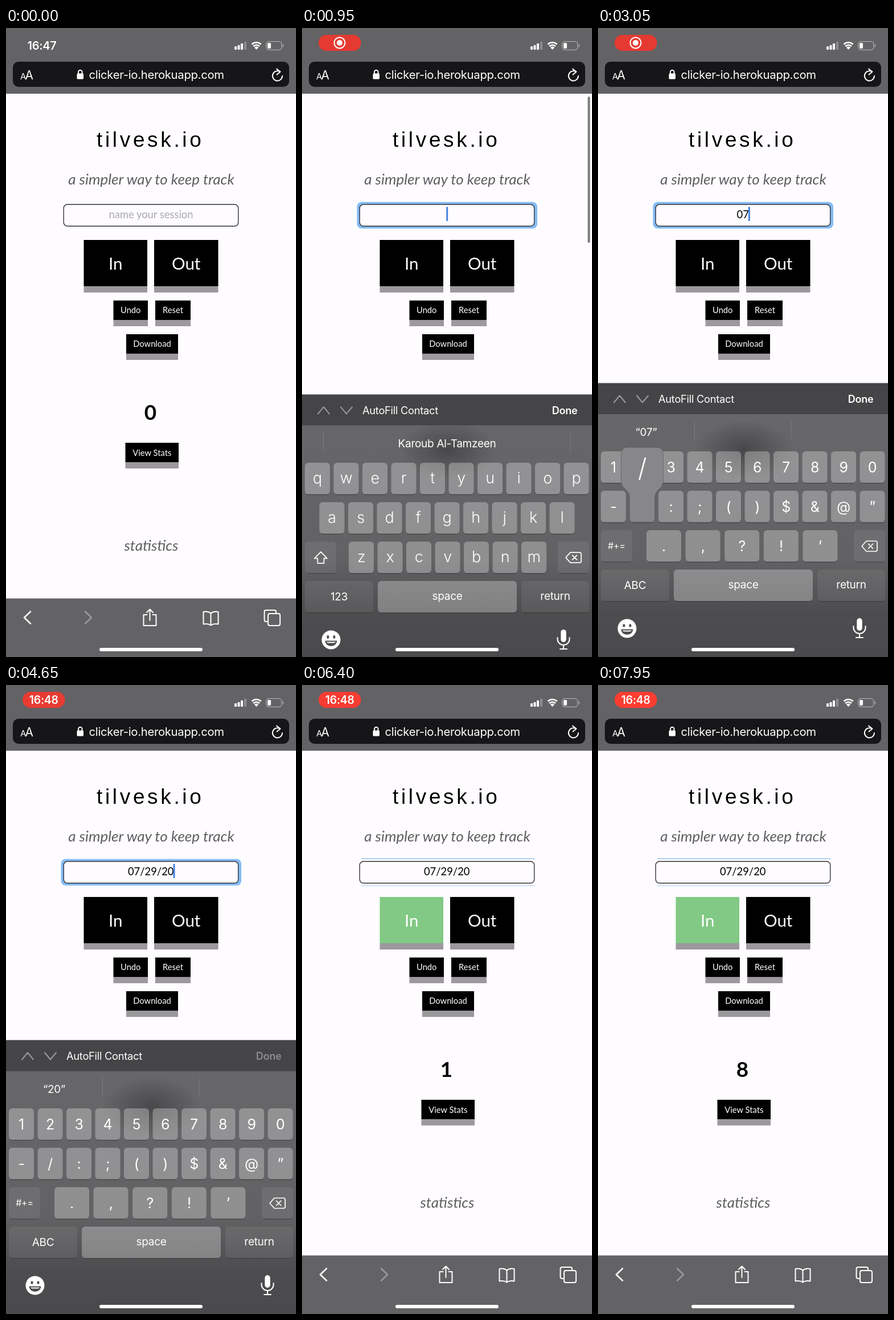
An HTML page that plays this animation: 509 by 1101 pixels, repeating every 8000 ms.

```html
<!DOCTYPE html>
<html lang="en">
<head>
<meta charset="utf-8">
<title>Counter demo</title>
<style>
  html, body { margin: 0; width: 100%; height: 100%; overflow: hidden; background: #fefcff; }
  svg { display: block; width: 509px; height: 1101px; }
  text { font-family: Inter, "Liberation Sans", sans-serif; letter-spacing: -.015em; fill: #fff; text-anchor: middle; }
  .lato { font-family: Lato, sans-serif; letter-spacing: 0; }
  .lead { font-size: 26px; font-style: italic; fill: #5f5e60; }
  .line { fill: none; stroke: #fff; stroke-width: 2; stroke-linecap: round; stroke-linejoin: round; }
  .dim { stroke: #9a999b; }
  .start { text-anchor: start; }
</style>
</head>
<body>
<svg viewBox="0 0 509 1101">
  <defs>
    <linearGradient id="backdrop" gradientUnits="userSpaceOnUse" x1="0" y1="676" x2="0" y2="1101">
      <stop offset="0" stop-color="#676668"/>
      <stop offset=".6" stop-color="#626163"/>
      <stop offset=".82" stop-color="#4d4c4e"/>
      <stop offset="1" stop-color="#4a494b"/>
    </linearGradient>
    <radialGradient id="smear">
      <stop offset="0" stop-color="#434244" stop-opacity=".85"/>
      <stop offset=".4" stop-color="#434244" stop-opacity=".5"/>
      <stop offset="1" stop-color="#434244" stop-opacity="0"/>
    </radialGradient>
    <clipPath id="panelClip"><rect id="panelArea" width="509" height="1101"/></clipPath>
  </defs>
  <rect width="509" height="1101" fill="#fefcff"/>

  <g id="page">
    <text x="159" y="208" class="start" style="font:36.9px 'Liberation Sans',Arial,sans-serif;letter-spacing:4.7px;fill:#000">tilvesk.io</text>
    <text x="255" y="274" class="lato lead">a simpler way to keep track</text>
    <text x="255" y="915" class="lato lead">statistics</text>
    <rect id="ring" x="96.5" y="304.500" width="316.500" height="46.500" rx="8" fill="#86bcf5"/>
    <g id="ringTrace" fill="none" stroke-width="1.5">
      <path d="M104 304H408" stroke="#94c2f2"/><path d="M104 351.5H408" stroke="#c3d5f5"/>
    </g>
    <rect x="101.2" y="308.800" width="306.500" height="38" rx="6.5" fill="#fefcff" stroke="#333235" stroke-width="1.4"/>
    <text id="hint" x="254.5" y="333" class="lato" font-size="18.4" style="fill:#a9a8ab">name your session</text>
    <text id="entry" x="254.2" y="333" class="lato" font-size="18.4" style="fill:#000"></text>
    <rect id="caret" y="313" width="3" height="25" rx="1" fill="#4484e0"/>
    <g id="buttons"></g>
    <text id="count" x="253.5" y="686" class="lato" font-size="36.9" font-weight="700" style="fill:#000"></text>
    <rect id="scrollbar" x="501.5" y="120" width="4" height="256" rx="2" fill="#7b7a7c"/>
  </g>

  <g id="header">
    <rect width="509" height="115" fill="#636264"/>
    <rect x="12" y="59" width="485" height="44" rx="10" fill="#161517"/>
    <text x="25" y="90" class="start" font-size="15">A</text>
    <text x="33.5" y="90" class="start" font-size="21">A</text>
    <rect x="124.5" y="79.5" width="11.5" height="10" rx="1.5" fill="#fff"/>
    <path class="line" d="M127 80V77a3.3 3.3 0 0 1 6.6 0V80"/>
    <text x="145.5" y="89" class="start" font-size="20.3">clicker-io.herokuapp.com</text>
    <path class="line" d="M481 76.5A8.6 8.6 0 1 0 485 84M475 71.5L481.5 76.5L475.5 81.5"/>
    <g fill="#fff">
      <rect x="401" y="32" width="4" height="6" rx="1"/><rect x="406.5" y="30" width="4" height="8" rx="1"/>
      <rect x="412" y="27" width="4" height="11" rx="1"/><rect x="418" y="24" width="4" height="14" rx="1" fill="#8d8c8e"/>
      <path d="M439.5 38L435.8 34a5.4 5.4 0 0 1 7.4 0Z"/>
      <rect x="459" y="26" width="6" height="10" rx="2"/>
    </g>
    <path class="line" d="M431.5 28.5a11.5 11.5 0 0 1 16 0M434 32a8 8 0 0 1 11 0" style="stroke-width:2.6;stroke-linecap:butt"/>
    <rect x="456.7" y="23.7" width="27" height="14.6" rx="4.5" fill="none" stroke="#a9a8aa" stroke-width="1.3"/>
    <path d="M485.5 28q2 1 2 3t-2 3Z" fill="#a9a8aa"/>
    <text id="plainTime" x="63" y="38" font-size="20" font-weight="600">16:47</text>
    <g id="pill">
      <rect id="pillBack" x="29" y="12" width="74.5" height="28" rx="14"/>
      <g id="record"><circle class="line" cx="66" cy="26" r="9.5"/><circle cx="66" cy="26" r="5" fill="#fff"/></g>
      <text id="pillTime" x="66.3" y="33" font-size="19.5" font-weight="600">16:48</text>
    </g>
  </g>

  <g id="toolbar">
    <rect y="998.5" width="509" height="103" fill="#636264"/>
    <path class="line" d="M43 1021.5L32 1032L43 1042.5" style="stroke-width:2.6"/>
    <path class="line dim" d="M139 1021.5L150 1032L139 1042.5" style="stroke-width:2.6"/>
    <path class="line" d="M247.5 1027H241.5V1046H263.5V1027H257.5M252.5 1037V1018M247 1023L252.5 1017.5L258 1023"/>
    <path class="line" d="M359.5 1024.5q-5-4-13-2.5V1043.5q8-1.5 13 2q5-3.5 13-2V1022q-8-1.5-13 2.5V1045"/>
    <path class="line" d="M460 1039H456.5q-3 0-3-3V1022q0-3 3-3H471q3 0 3 3V1025"/>
    <rect class="line" x="460" y="1025" width="21" height="21" rx="3"/>
  </g>

  <g id="backing" clip-path="url(#panelClip)">
    <rect y="600" width="509" height="501" fill="url(#backdrop)"/>
    <ellipse cx="256" cy="738" rx="85" ry="52" fill="url(#smear)"/>
  </g>
  <g id="keyboard">
    <rect y="621.5" width="509" height="54.5" fill="#454446"/>
    <path class="line dim" d="M28 655.5L38 643.5L48 655.5M68 643.5L78 655.5L88 643.5"/>
    <text x="106" y="656" class="start" font-size="18.3">AutoFill Contact</text>
    <text id="done" x="461" y="656" font-size="18" font-weight="600">Done</text>
    <g id="contact">
      <path d="M37.5 688V720M471.5 688V720" stroke="#7b7a7c"/>
      <text x="254.5" y="714" font-size="19">Karoub Al-Tamzeen</text>
    </g>
    <g id="guess">
      <path d="M169.5 688V720M339 688V720" stroke="#7b7a7c"/>
      <text id="guessText" x="84.5" y="714" font-size="19"></text>
    </g>
    <g id="letters"></g>
    <g id="numbers"></g>
    <g id="common"></g>
    <circle cx="51" cy="1051" r="16.5" fill="#fff"/>
    <g fill="#4c4b4d"><ellipse cx="45.5" cy="1046" rx="2" ry="2.8"/><ellipse cx="56.5" cy="1046" rx="2" ry="2.8"/><path d="M40.5 1052.5H61.5a10.5 9.5 0 0 1-21 0Z"/></g>
    <path d="M43 1054.5H59q-1 2-3 2H46q-2 0-3-2Z" fill="#fff"/>
    <rect x="454.3" y="1033" width="9.4" height="22" rx="4.7" fill="#fff"/>
    <path class="line" d="M448.5 1047v3a10.5 10 0 0 0 21 0v-3M459 1060V1067M453 1067H465"/>
    <g id="popup">
      <path id="bubble" fill="#878688" stroke="#4a494b" stroke-opacity=".5"/>
      <text id="bubbleText" font-size="45" font-weight="300"></text>
    </g>
  </g>
  <rect x="164" y="1085" width="181" height="6" rx="3" fill="#fff"/>
</svg>
<script>
const LOOP = 8000, FOCUS = 628, NUMBERS = 1950, DONE = 4600, CLOSE = 4750;
const PILL = 200, CLOCK = 3800, FIRST_TAP = 6250, TAP_GAP = 220;
// character, touch down, touch up
const presses = [
  ['0', 2250, 2340], ['7', 2500, 2600], ['/', 2980, 3120], ['2', 3250, 3350],
  ['9', 3480, 3580], ['/', 3720, 3820], ['2', 3930, 4030], ['0', 4150, 4250]
];
const ui = {};
document.querySelectorAll('[id]').forEach(node => ui[node.id] = node);
const show = (node, on) => node.setAttribute('visibility', on ? 'visible' : 'hidden');
const clamp = (v, lo, hi) => Math.min(hi, Math.max(lo, v));

function button(label, x, y, w, h, size, baseline, id = '') {
  return `<rect x="${x}" y="${y + h}" width="${w}" height="11" fill="#9b999c"/>
    <rect id="${id}" x="${x}" y="${y}" width="${w}" height="${h}"/>
    <text class="lato" x="${x + w / 2}" y="${baseline}" font-size="${size}">${label}</text>`;
}
ui.buttons.innerHTML =
  button('In', 136.5, 371, 111.5, 81, 29.5, 423, 'inButton') +
  button('Out', 260, 371, 112.5, 81, 29.5, 423) +
  button('Undo', 188.5, 477, 60.5, 34, 14.75, 499) +
  button('Reset', 262, 477, 62, 34, 14.75, 499) +
  button('Download', 211, 536, 91, 34, 14.75, 558) +
  button('View Stats', 209.5, 726, 93.5, 34, 14.75, 749);
const inButton = document.getElementById('inButton');

const keyAt = {};
function key(label, x, y, w = 44, size = 27, special = false) {
  keyAt[label] = { x, y };
  const lift = /^[a-z]+$/.test(label) ? .31 : .36;
  return `<path d="M${x + 4} ${y + 55.8}h${w - 8}" stroke="#2b2a2c" stroke-opacity=".4" stroke-width="1.6" stroke-linecap="round"/>
    <rect x="${x}" y="${y}" width="${w}" height="55" rx="6" fill="#fff" opacity="${special ? .07 : .29}"/>
    <text x="${x + w / 2}" y="${y + 27.5 + size * lift}" font-size="${size}" font-weight="${size > 26 ? 300 : 400}">${label}</text>`;
}
const row = (chars, x, y, step = 50.5, w = 44, size = 27) =>
  [...chars].map((c, i) => key(c === '&' ? '&amp;' : c, x + i * step, y, w, size)).join('');

ui.letters.innerHTML = row('qwertyuiop', 5, 741) + row('asdfghjkl', 30.5, 810) +
  row('zxcvbnm', 82, 879) + key('', 5, 879, 55, 19, true) + key('123', 5, 948, 120, 19, true) +
  '<path class="line" d="M33 897L44 908.5H38.5V917H27.5V908.5H22Z" style="stroke-width:1.7"/>';
ui.numbers.innerHTML = row('1234567890', 5, 741, 50.5, 44, 25) + row('-/:;()$&@”', 5, 810, 50.5, 44, 25) +
  row('.,?!’', 85, 879, 68.6, 61, 25) + key('#+=', 5, 879, 55, 16, true) + key('ABC', 5, 948, 120, 19, true);
ui.common.innerHTML = key('', 449, 879, 55, 19, true) + key('space', 133, 948, 244, 19) +
  key('return', 385, 948, 119, 19, true) +
  '<path class="line" d="M463 907L471 898H487q3 0 3 3V913q0 3-3 3H471ZM474.5 903L482.5 911M482.5 903L474.5 911" style="stroke-width:1.7"/>';

function drawPopup(char) {
  const { x, y } = keyAt[char], left = clamp(x - 15, 5, 430), right = left + 74, top = y - 76;
  ui.bubble.setAttribute('d', `M${left} ${top + 12}q0-12 12-12H${right - 12}q12 0 12 12V${y - 18}
    C${right} ${y - 2} ${x + 44} ${y - 4} ${x + 44} ${y + 14}V${y + 49}q0 6-6 6H${x + 6}q-6 0-6-6V${y + 14}
    C${x} ${y - 4} ${left} ${y - 2} ${left} ${y - 18}Z`);
  ui.bubbleText.setAttribute('x', left + 37);
  ui.bubbleText.setAttribute('y', y - 24);
  ui.bubbleText.textContent = char;
}

const settle = ms => ms <= 0 ? 0 : 1 - (1 + ms / 65) * Math.exp(-ms / 65);

function caretOpacity(idle) {
  const phase = idle % 1150;
  if (phase < 550) return 1;
  return phase < 1000 ? clamp((750 - phase) / 200, 0, 1) : (phase - 1000) / 150;
}

function render(t) {
  const focused = t >= FOCUS && t < CLOSE;
  const typed = presses.filter(p => t >= p[2]);
  const text = typed.map(p => p[0]).join('');
  const held = presses.find(p => t >= p[1] && t < p[2]);

  show(ui.hint, t < FOCUS);
  show(ui.ring, focused);
  show(ui.ringTrace, t >= CLOSE);
  ui.entry.textContent = text;
  const width = text ? ui.entry.getComputedTextLength() : 0;
  ui.caret.setAttribute('x', 253.2 + width / 2);
  const lastInput = typed.length ? typed[typed.length - 1][2] : FOCUS;
  ui.caret.setAttribute('opacity', focused ? caretOpacity(t - lastInput) : 0);
  ui.scrollbar.setAttribute('opacity', t < FOCUS ? 0 : clamp((1400 - t) / 250, 0, 1));

  const taps = t < FIRST_TAP ? 0 : 1 + Math.floor((t - FIRST_TAP) / TAP_GAP);
  ui.count.textContent = taps;
  inButton.setAttribute('fill', taps ? '#82c985' : '#000');

  show(ui.plainTime, t < PILL);
  show(ui.pill, t >= PILL);
  ui.record.setAttribute('opacity', t < CLOCK ? 1 : 0);
  ui.pillTime.setAttribute('opacity', t < CLOCK ? 0 : 1);
  const glow = .5 - .5 * Math.cos((t - 750) / 2100 * 2 * Math.PI);
  ui.pillBack.setAttribute('fill', `rgb(${226 + 29 * glow},${58 + 3 * glow},50)`);

  const shift = 480 * (1 - settle(t - FOCUS) + settle(t - CLOSE));
  ui.keyboard.setAttribute('transform', `translate(0 ${shift})`);
  ui.panelArea.setAttribute('y', 676 + shift);
  const numeric = t >= NUMBERS;
  show(ui.letters, !numeric);
  show(ui.numbers, numeric);
  show(ui.contact, !text);
  show(ui.guess, text);
  const token = text.split('/').pop();
  ui.guessText.textContent = token ? `“${token}”` : '';
  ui.done.style.fill = t >= DONE ? '#8b8a8c' : '#fff';
  show(ui.popup, held);
  if (held) drawPopup(held[0]);
}

const start = performance.now();
function tick() {
  render((performance.now() - start) % LOOP);
  requestAnimationFrame(tick);
}
tick();
</script>
</body>
</html>
```
